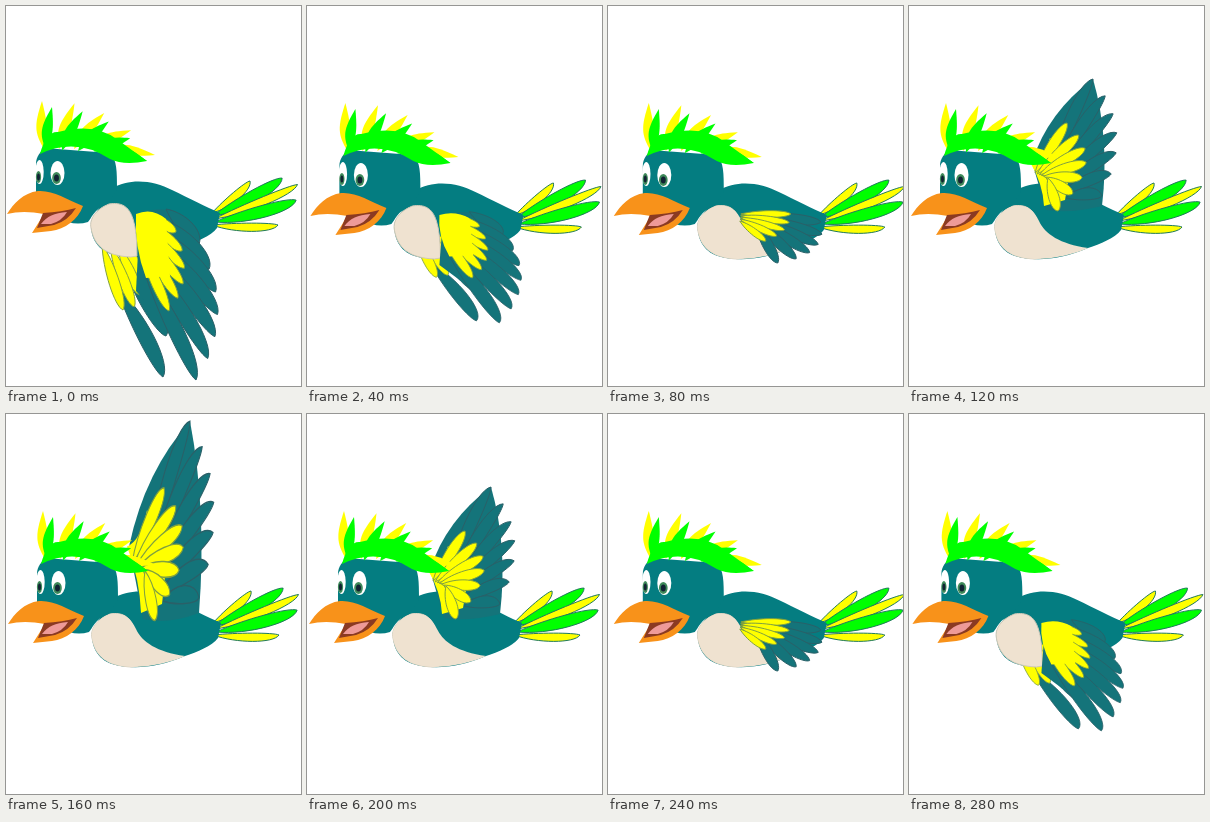
An HTML page for the animation above (320 ms loop, 295x380 px).

```html
<!DOCTYPE html>
<html lang="en">
<head>
<meta charset="utf-8">
<title>Flying bird</title>
<style>
  html, body { margin: 0; width: 100%; height: 100%; overflow: hidden; background: #fff; }
  svg { display: block; width: 100vw; height: 100vh; }
</style>
</head>
<body>
<svg viewBox="0 0 295 380">
  <g id="bird">
    <g id="tail"></g>
    <path fill="#047d81" d="M105 183C125 171 148 175 166 184C183 192 200 201 214 207L211 222C205 230 190 236 178 240C150 252 125 254 105 248C90 243 84 230 85 215Z"/>
    <g id="far"></g>
    <path fill="#efe2d0" stroke="#cfc9b8" d="M103 198C90 203 83 213 85 222C88 240 100 250 125 251L131 250Q131 225 127 213C123 200 115 196 103 198Z"/>
    <path id="belly" fill="#efe2d0" d="M103 198C90 203 83 213 85 222C88 240 100 250 125 251C145 251 165 246 178 240C150 236 135 226 129 213C123 200 115 196 103 198Z"/>
    <path fill="#047d81" d="M30 158C30 150 35 146 38 142L104 147C111 154 111 165 111 184L101 198C88 203 85 213 82 216Q72 219 62 216L56 202L30 188Z"/>
    <g id="near"></g>
    <g id="crest"></g>
    <g id="eyes"></g>
    <path fill="#f8921a" d="M1 208C8 197 17 187 32 185C47 184 60 193 77 200C72 214 59 223 45 225L26 227L38 208Q17 204 1 208Z"/>
    <path fill="#8b3a22" d="M37 207Q56 206 70 202Q62 215 48 219L31 222Z"/>
    <path fill="#ee9a98" d="M35 218C41 210 48 207 61 206Q56 215 45 218Z"/>
  </g>
</svg>
<script>
const $ = id => document.getElementById(id);
const YELLOW = '#ff0', GREEN = '#0f0', TEAL = '#14747a', EDGE = '#2a6068', OLIVE = '#7fa040';

const mix = (a, b, t) => a.map((v, i) => v + (b[i] - v) * t);
const curve = (a, b, c, t) => mix(mix(a, b, t), mix(b, c, t), t);
const shape = (fill, d, line = 'none') => `<path fill="${fill}" stroke="${line}" d="${d}"/>`;

// Leaf of half width w from base to tip; bow bends it, full rounds its end
function feather(base, tip, { fill, line, w, bow = 0, full = .92 }) {
  const [dx, dy] = [tip[0] - base[0], tip[1] - base[1]], len = Math.hypot(dx, dy);
  const at = (k, side) => [base[0] + dx * k - dy / len * side, base[1] + dy * k + dx / len * side];
  return shape(fill, `M${base}C${at(.35, bow + w)} ${at(full, bow + w)} ${tip}` +
    `C${at(full, bow - w)} ${at(.35, bow - w)} ${base}Z`, line);
}

// n feathers: bases along the line a-b, tips along the curve p-q-r
function fan(n, a, b, p, q, r, look) {
  let out = '';
  for (let i = 0; i < n; i++) {
    const t = i / (n - 1);
    out += feather(mix(a, b, t), curve(p, q, r, t), look);
  }
  return out;
}

const teal = { fill: TEAL, line: EDGE, w: 10, bow: -4 };
const gold = { fill: YELLOW, line: OLIVE, w: 7 };

const tailEnd = t => curve([244, 175], [325, 160], [272, 219], t);
for (let i = 0; i < 5; i++) {
  $('tail').innerHTML += feather([206 + i % 4, 207 + i * 3], tailEnd(i / 4),
    { fill: i % 2 ? GREEN : YELLOW, line: '#1f7a5c', w: i % 2 ? 8 : 5.5, bow: 3 });
}

$('crest').innerHTML =
  fan(5, [38, 143], [98, 143], [36, 95], [104, 92], [149, 149], { fill: YELLOW, w: 7, bow: -2, full: .5 }) +
  fan(5, [40, 144], [104, 146], [46, 101], [112, 103], [141, 155], { fill: GREEN, w: 7, bow: -2, full: .5 }) +
  shape(GREEN, 'M34 148Q40 125 52 126Q90 116 112 134L141 155Q118 160 104 153Q70 131 34 148Z');

const oval = (fill, x, y, rx, ry) => `<ellipse fill="${fill}" cx="${x}" cy="${y}" rx="${rx}" ry="${ry}"/>`;
const eye = (x, y, r) => oval('#fff', x, y, r, 12) +
  oval('#3f8a5a', x - 1, y + 5, r * .62, 6) + oval('#123', x - 1, y + 5, r * .35, 3.5);
$('eyes').innerHTML = eye(33.5, 166, 4.2) + eye(51.5, 167, 7);

const down = {
  far:
    fan(2, [124, 275], [110, 280], [160, 330], [150, 350], [157, 371], teal) +
    fan(4, [120, 240], [96, 238], [134, 268], [138, 306], [117, 304], gold),
  near:
    shape(TEAL, 'M134 207Q170 195 183 222L192 300L165 325L130 285Z') +
    fan(7, [160, 203], [138, 265], [192, 240], [232, 310], [190, 374], teal) +
    fan(6, [140, 207], [133, 238], [170, 226], [190, 275], [163, 305], gold) +
    shape(YELLOW, 'M130 208Q146 201 160 213L164 270L140 272Q128 240 130 208Z')
};

const level = {
  near:
    fan(6, [140, 207], [142, 213], [208, 214], [217, 247], [165, 255], { ...teal, w: 7, bow: 0 }) +
    fan(5, [128, 206], [127, 213], [178, 206], [178, 224], [153, 233], { ...gold, w: 4.5 })
};

const up = {
  near:
    shape(TEAL, 'M122 154Q138 104 183 71Q200 130 192 198Q160 206 136 202Z') +
    fan(7, [140, 165], [156, 190], [183, 71], [226, 120], [192, 188], { ...teal, w: 8 }) +
    shape(YELLOW, 'M120 154Q134 150 140 130L162 150L155 192L134 198Q133 176 120 154Z') +
    fan(7, [125, 165], [138, 170], [157, 115], [200, 150], [148, 203], gold)
};

// Stretch by k about the shoulder height y, moved sideways by x
const stretch = (k, y, x = 0) => `translate(${x} ${y}) scale(1 ${k}) translate(0 ${-y})`;

const STEP = 40, STEPS = 8;
let shown = -1;

function pose(step) {
  const lift = Math.min(step, STEPS - step);   // 0 wings down, 4 wings up
  const wing = lift < 2 ? down : lift < 3 ? level : up;
  const k = lift === 1 ? .65 : lift === 4 ? 1.51 : 1;
  $('near').innerHTML = wing.near;
  $('far').innerHTML = wing.far || '';
  $('near').setAttribute('transform', stretch(k, lift < 3 ? 205 : 200));
  $('far').setAttribute('transform', stretch(k, 205, lift * 10));
  $('belly').style.display = wing === down ? 'none' : '';
  $('bird').setAttribute('transform', `translate(${lift < 3 ? 2.4 * lift : 1} ${lift ? 2 : 0})`);
}

function draw() {
  const step = Math.floor(performance.now() / STEP) % STEPS;
  if (step !== shown) pose(shown = step);
  requestAnimationFrame(draw);
}
draw();
</script>
</body>
</html>
```
